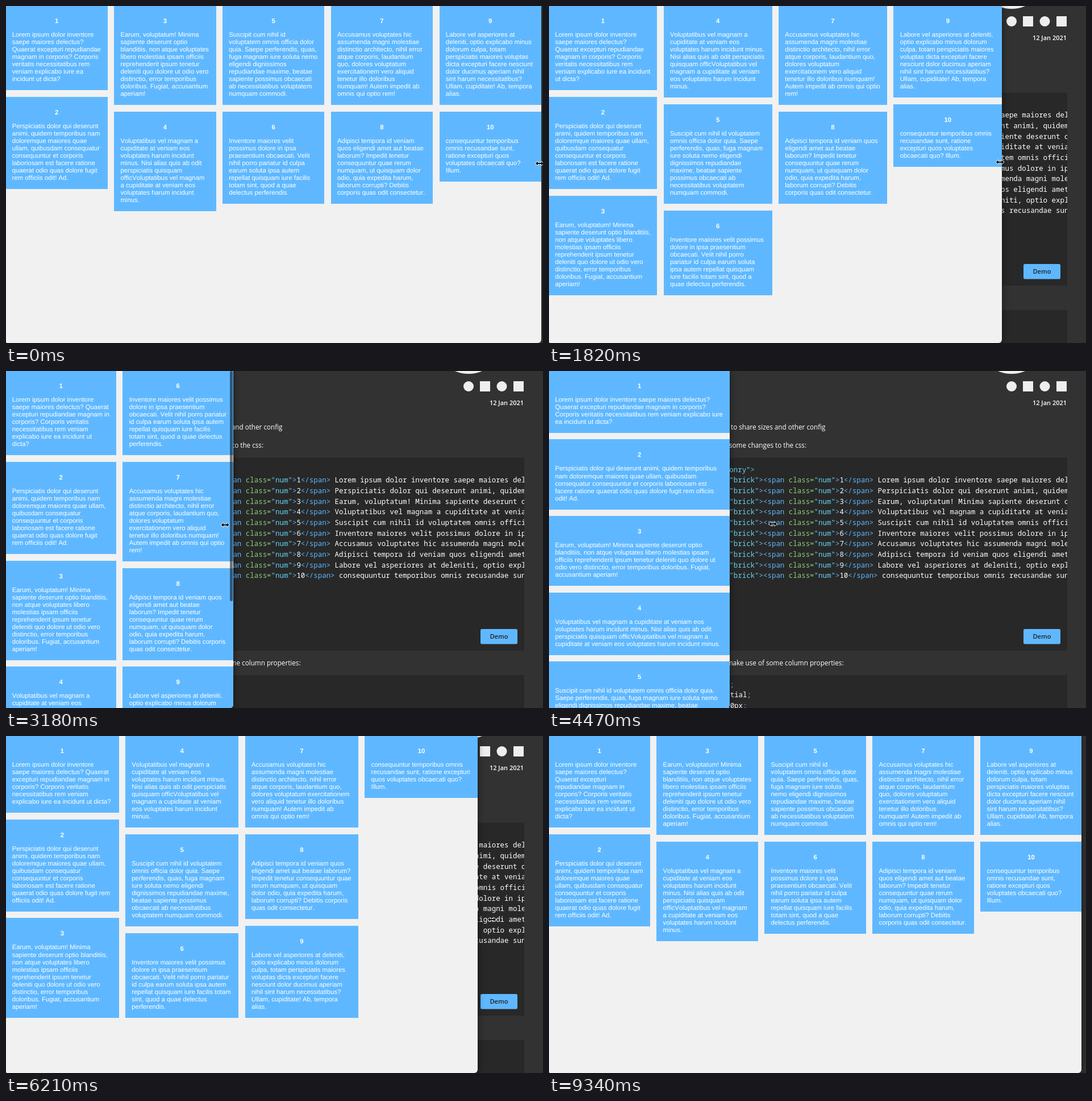
An HTML page for the animation above (9810 ms loop, 945x593 px).

```html
<!DOCTYPE html>
<html lang="en">
<head>
<meta charset="utf-8">
<title>Masonry columns</title>
<style>
html, body { margin: 0; width: 100%; height: 100%; overflow: hidden; background: #323232; }
#stage { position: relative; width: 945px; height: 593px; overflow: hidden; background: #323232; }
#article, #cursor { position: absolute; left: 0; top: 0; }
#article text { white-space: pre; fill: #fff; font: 11.7px "Open Sans", sans-serif; }
#article .code { font: 12.45px "Noto Sans Mono", monospace; }
.tag { fill: #5fb8ff; }
.attr { fill: #8ccf7a; }
.str { fill: #66d3f5; }
#window {
  position: absolute; left: 0; top: 0; height: 593px; overflow: hidden;
  background: #f1f1f1; border-radius: 0 0 6px 2px; box-shadow: 0 0 12px rgba(0, 0, 0, .5);
}
#masonry {
  position: absolute; left: -.7px; top: -1.1px;
  columns: 177px; column-gap: 11.34px;
  font: 11.34px/13.06px "Liberation Sans", Arial, sans-serif;
  font-kerning: none; font-variant-ligatures: none; text-rendering: geometricPrecision;
}
.brick {
  break-inside: avoid; margin-bottom: 11.34px; padding: 22px 11.34px 12px;
  background: #5fb8ff; color: #fff;
}
.brick b { display: block; margin-bottom: 10.94px; text-align: center; }
#thumb {
  position: absolute; right: .5px; top: 0; width: 5.5px;
  border-radius: 3px; background: rgba(0, 0, 0, .52);
}
</style>
</head>
<body>
<div id="stage">
  <svg id="article" width="945" height="593">
    <rect y="152.5" width="912" height="339.5" fill="#282828"/>
    <rect y="535" width="912" height="58" fill="#282828"/>
    <g fill="#eee">
      <circle cx="814" cy="-55" r="60"/>
      <circle cx="814" cy="27" r="9"/>
      <rect x="834" y="18" width="18" height="18"/>
      <circle cx="872.5" cy="27" r="9"/>
      <rect x="893" y="18" width="18" height="18"/>
    </g>
    <text x="911" y="59.5" text-anchor="end" style="font-size:11px;font-weight:600">12 Jan 2021</text>
    <text x="486.5" y="103" text-anchor="end">to share sizes and other config</text>
    <text x="453" y="135" text-anchor="end">some changes to the css:</text>
    <text x="518.5" y="517.5" text-anchor="end">make use of some column properties:</text>
    <svg id="code" width="912" height="593"></svg>
    <rect x="835" y="454" width="65" height="26.5" rx="2.5" fill="#5fb8ff"/>
    <text x="867.5" y="471" text-anchor="middle" style="font-size:11.2px;font-weight:600;fill:#222">Demo</text>
  </svg>
  <div id="window">
    <div id="masonry"></div>
    <div id="thumb"></div>
  </div>
  <svg id="cursor" width="20" height="20" viewBox="-10 -10 20 20" overflow="visible">
    <path id="shape" fill="#000" stroke="#fff" stroke-width="1.6" paint-order="stroke" stroke-linejoin="round"/>
  </svg>
</div>
<script>
const LOOP = 9810;
const texts = [
  'Lorem ipsum dolor inventore saepe maiores delectus? Quaerat excepturi repudiandae magnam in corporis? Corporis veritatis necessitatibus rem veniam explicabo iure ea incidunt ut dicta?',
  'Perspiciatis dolor qui deserunt animi, quidem temporibus nam doloremque maiores quae ullam, quibusdam consequatur consequuntur et corporis laboriosam est facere ratione quaerat odio quas dolore fugit rem officiis odit! Ad.',
  'Earum, voluptatum! Minima sapiente deserunt optio blanditiis, non atque voluptates libero molestias ipsam officiis reprehenderit ipsum tenetur deleniti quo dolore ut odio vero distinctio, error temporibus doloribus. Fugiat, accusantium aperiam!',
  'Voluptatibus vel magnam a cupiditate at veniam eos voluptates harum incidunt minus. Nisi alias quis ab odit perspiciatis quisquam officVoluptatibus vel magnam a cupiditate at veniam eos voluptates harum incidunt minus.',
  'Suscipit cum nihil id voluptatem omnis officia dolor quia. Saepe perferendis, quas, fuga magnam iure soluta nemo eligendi dignissimos repudiandae maxime, beatae sapiente possimus obcaecati ab necessitatibus voluptatem numquam commodi.',
  'Inventore maiores velit possimus dolore in ipsa praesentium obcaecati. Velit nihil porro pariatur id culpa earum soluta ipsa autem repellat quisquam iure facilis totam sint, quod a quae delectus perferendis.',
  'Accusamus voluptates hic assumenda magni molestiae distinctio architecto, nihil error atque corporis, laudantium quo, dolores voluptatum exercitationem vero aliquid tenetur illo doloribus numquam! Autem impedit ab omnis qui optio rem!',
  'Adipisci tempora id veniam quos eligendi amet aut beatae laborum? Impedit tenetur consequuntur quae rerum numquam, ut quisquam dolor odio, quia expedita harum, laborum corrupti? Debitis corporis quas odit consectetur.',
  'Labore vel asperiores at deleniti, optio explicabo minus dolorum culpa, totam perspiciatis maiores voluptas dicta excepturi facere nesciunt dolor ducimus aperiam nihil sint harum necessitatibus? Ullam, cupiditate! Ab, tempora alias.',
  'consequuntur temporibus omnis recusandae sunt, ratione excepturi quos voluptates obcaecati quo? Illum.'
];

// Bursts of screen updates: first, last, number of steps
const bursts = [
  [720, 1680, 8], [1820, 2790, 8], [2910, 3890, 8], [4000, 4970, 9],
  [5090, 5970, 7], [6210, 7120, 7], [7870, 8250, 4], [8720, 9340, 6]
];

// time, window width, layout width, cursor x, cursor y
const keys = [
  [0, 942, 942.7, 939, 277],
  [600, 942, 942.7, 939, 277],
  [720, 936, 940, 930, 277],
  [1268, 865, 867.5, 844, 275],
  [1680, 849, 849.7, 845, 275],
  [2512, 541.5, 543, 539, 273],
  [2790, 516, 517, 508, 272],
  [3470, 318, 319.5, 300, 270],
  [3890, 318, 319.5, 296, 269],
  [4364, 318, 319.5, 345, 269],
  [4485, 318, 319.5, 394, 269],
  [4970, 505, 506, 541, 290],
  [5970, 822, 823, 856, 320],
  [6210, 830, 831.3, 855, 323],
  [7120, 957, 958.3, 965, 330],
  [7870, 955, 956, 958, 332],
  [8250, 936.5, 938.5, 935, 333],
  [8720, 936.5, 938.5, 935, 340],
  [9340, 936.5, 938.5, 906, 610],
  [LOOP, 936.5, 938.5, 906, 610]
];

const RESIZE = 'M-7 0l4-3.5v2.5h6v-2.5l4 3.5l-4 3.5v-2.5h-6v2.5z';
const ARROW = 'M-3-6v12l2.8-2.6l1.8 4l2-.9l-1.8-3.9h3.8z';
const $ = id => document.getElementById(id);
const win = $('window'), masonry = $('masonry'), thumb = $('thumb');
const cursor = $('cursor'), shape = $('shape');

const span = (cls, s) => `<tspan class="${cls}">${s.replace(/</g, '&lt;')}</tspan>`;
const line = (x, y, body, anchor = 'start') =>
  `<text class="code" x="${x}" y="${y}" text-anchor="${anchor}">${body}</text>`;
const open = (name, cls) =>
  span('tag', '<' + name) + span('attr', ' class=') + span('str', `"${cls}"`) + span('tag', '>');
const rule = (x, y, prop, value) =>
  line(x, y, span('tag', prop + ': ') + value + span('tag', ';'), 'end');

masonry.innerHTML = texts.map((s, i) => `<div class="brick"><b>${i + 1}</b>${s}</div>`).join('');
$('code').innerHTML = line(205.3, 177.6, open('div', 'masonry')) +
  texts.map((s, i) => line(235.2, 196.3 + i * 18.67,
    open('div', 'brick') + open('span', 'num') + (i + 1) + span('tag', '</span>') + ' ' + s)).join('') +
  rule(326, 555.5, 'columns', 'auto') +
  rule(356, 574, 'column-count', 'initial') +
  rule(348.5, 592.5, 'column-gap', '10px');

function snap(t) {
  t += 20;
  const burst = bursts.filter(b => b[0] <= t).pop();
  if (!burst) return 0;
  const [first, last, n] = burst, step = (last - first) / (n - 1);
  return first + step * Math.min(n - 1, Math.floor((t - first) / step));
}

function pose(t) {
  const i = Math.max(1, keys.findIndex(k => k[0] >= t));
  const a = keys[i - 1], b = keys[i], p = (t - a[0]) / (b[0] - a[0]);
  return a.map((v, j) => v + (b[j] - v) * p);
}

let shown = -1;
function draw(time) {
  const t = snap(time);
  if (t === shown) return;
  shown = t;
  const [, width, layout, x, y] = pose(t);
  win.style.width = width + 'px';
  masonry.style.width = layout + 'px';
  const tall = masonry.offsetHeight + 10;
  thumb.style.display = tall > 593 && t > 2200 && t < 3400 ? 'block' : 'none';
  thumb.style.height = 593 * 593 / tall + 'px';
  shape.setAttribute('d', t > 8720 ? ARROW : RESIZE);
  cursor.style.transform = `translate(${x - 10}px, ${y - 10}px)`;
}

function tick() {
  draw(performance.now() % LOOP);
  requestAnimationFrame(tick);
}
tick();
</script>
</body>
</html>
```
